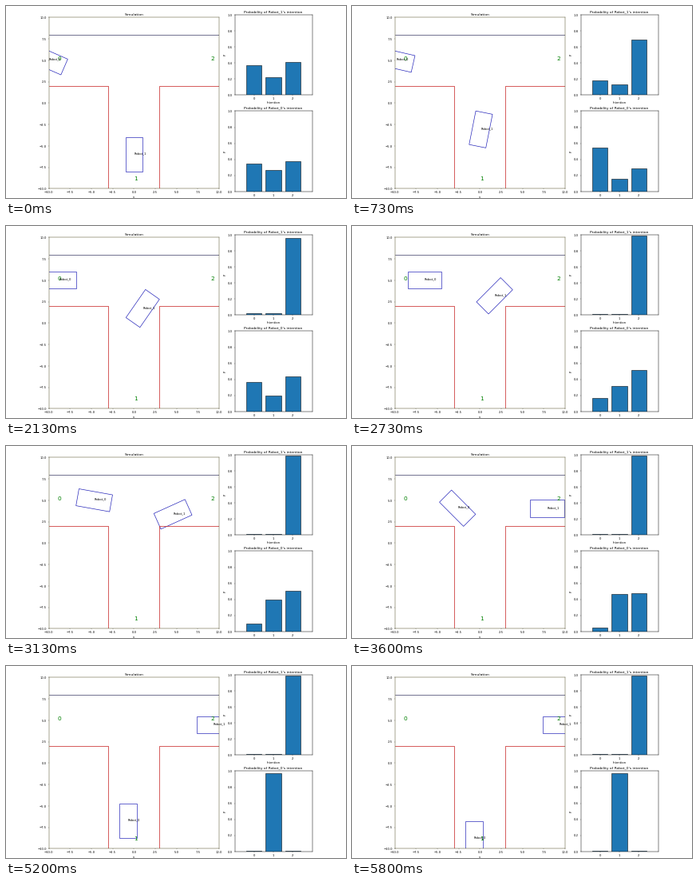
These frames come from a looping animation (426x240 px, 5870 ms). A matplotlib script:

```python
import numpy as np
import matplotlib.pyplot as plt
from matplotlib.animation import FuncAnimation
from matplotlib.patches import Rectangle

LOOP_MS, FRAMES = 5870, 88
DPI = 26.625
TOP_SPEED = 0.5

plt.rcParams.update({"font.family": "DejaVu Sans", "font.size": 10})
t = np.arange(FRAMES)


def line(a, b):
    """0 before step a, 1 after step b, straight between."""
    return np.clip((t - a) / (b - a), 0, 1)


def ramp(a, b):
    """Like line, with a soft start and end."""
    u = line(a, b)
    return u * u * (3 - 2 * u)


class Robot:
    LENGTH, WIDTH = 4, 2

    def __init__(self, ax, name, x, y, heading):
        self.pose = np.column_stack([x, y, heading])
        self.body = ax.add_patch(Rectangle(
            (0, 0), self.LENGTH, self.WIDTH, rotation_point="center",
            fill=False, edgecolor="#2020b8", linewidth=1.8))
        self.label = ax.text(0, 0, name)

    def move(self, i):
        x, y, heading = self.pose[i]
        self.body.set_xy((x - self.LENGTH / 2, y - self.WIDTH / 2))
        self.body.set_angle(heading)
        self.label.set_position((x, y))


class Belief:
    def __init__(self, ax, name, probs):
        self.probs = np.column_stack(probs)
        self.bars = ax.bar(range(3), self.probs[0], color="tab:blue",
                           edgecolor="black", linewidth=1.4)
        ax.set(xlim=(-1, 3), ylim=(0, 1), xticks=range(3), xlabel="Intention",
               ylabel="P", title=f"Probability of {name}'s intention")

    def move(self, i):
        for bar, p in zip(self.bars, self.probs[i]):
            bar.set_height(p)


def px_axes(left, top, right, bottom, edge="black"):
    """Axes placed by pixel edges of the 426 x 240 stage."""
    ax = fig.add_axes([left / 426, 1 - bottom / 240,
                       (right - left) / 426, (bottom - top) / 240])
    for spine in ax.spines.values():
        spine.set(linewidth=1.3, edgecolor=edge)
    return ax


def robot_0(ax):
    """Creeps in from the left, then swings down the side road."""
    x = -10 + 0.46 * line(0, 22) + 8.85 * ramp(23, 66)
    fall = np.cumsum(TOP_SPEED * line(45.5, 62.5))
    heading = -23.5 * (1 - line(0, 22)) - 90 * ramp(41, 65)
    return Robot(ax, "Robot_0", x, np.maximum(5.03 - fall, -8.8), heading)


def robot_1(ax):
    """Climbs the side road, then dashes off to the right."""
    climb, dash = line(0, 40), line(40, 56)
    x = 1.72 * climb ** 2 + 7.63 * dash
    y = -6 + 9.2 * climb * (1.37 - 0.37 * climb) + 1.3 * dash ** 2
    return Robot(ax, "Robot_1", x, y, 90 - 45 * climb - 45 * line(40, 53))


def belief_0():
    """Left guess peaks and fades; the rest is shared by the other two."""
    left = (0.35 + 0.45 * ramp(0, 22)) * np.exp(-np.maximum(t - 22, 0) / 11.4)
    left = np.maximum(left, 0.01)
    down = 0.42 - 0.145 * ramp(0, 22) + 0.24 * ramp(22, 60) + 0.47 * ramp(64, 77)
    return left, (1 - left) * down, (1 - left) * (1 - down)


def belief_1():
    """Softmax of scores that drift steadily toward the right."""
    scores = np.exp([-0.1 - 0.125 * t, -0.6 - 0.105 * t, 0 * t])
    return np.clip(scores / scores.sum(axis=0), 0.005, 0.99)


fig = plt.figure(figsize=(16, 9.0141), dpi=DPI, facecolor="white")

road = px_axes(53.5, 14.5, 267, 228.5, edge="#4c4820")
ticks = np.arange(-10, 10.1, 2.5)
road.set(xlim=(-10, 10), ylim=(-10, 10), xticks=ticks, yticks=ticks,
         xlabel="y", title="Simulation")
road.plot([-10, 10], [8, 8], color="#30305c", lw=1.8)
for side in (-1, 1):
    road.plot([10 * side, 3 * side, 3 * side], [2, 2, -10], color="#c82828", lw=2)
for n, spot in enumerate([(-9, 5), (0, -9), (9, 5)]):
    road.text(*spot, str(n), color="green", fontsize=20)

movers = [
    robot_0(road),
    robot_1(road),
    Belief(px_axes(286.5, 11, 383.5, 111), "Robot_1", belief_1()),
    Belief(px_axes(286.5, 131.5, 383.5, 232), "Robot_0", belief_0()),
]


def update(i):
    for mover in movers:
        mover.move(i)


anim = FuncAnimation(fig, update, frames=FRAMES, interval=LOOP_MS / FRAMES,
                     repeat=True, repeat_delay=0, blit=False)
plt.show()
```
